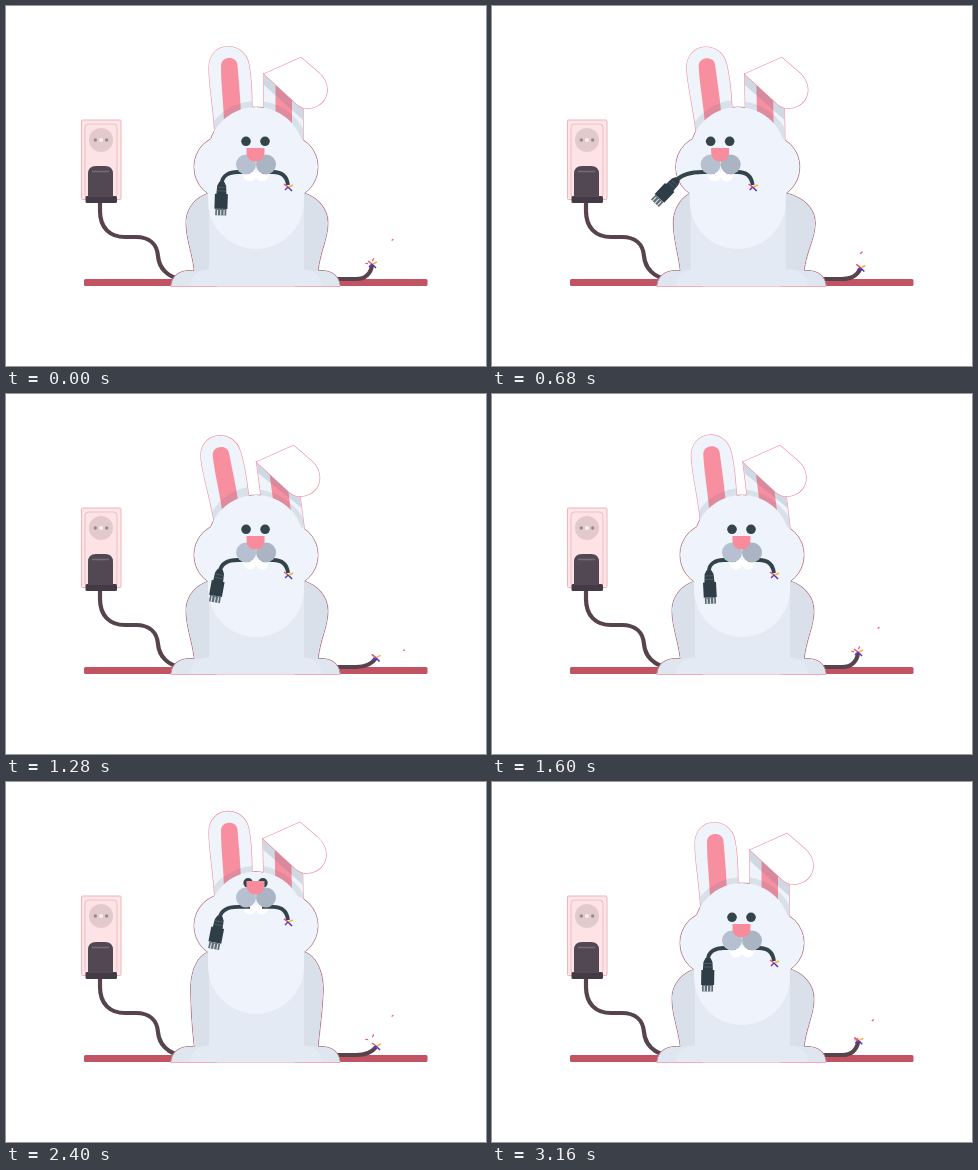
Recreate the animation shown at these times as an HTML page. Size 480x360 px, loop 3200 ms.

```html
<!DOCTYPE html>
<html lang="en">
<head>
<meta charset="utf-8">
<title>Rabbit and cable</title>
<style>
  html, body { margin: 0; width: 100%; height: 100%; overflow: hidden; background: #fff; }
  svg { display: block; width: 100vw; height: 100vh; }
  .rim { stroke: #f08fa0; stroke-width: 1.2; paint-order: stroke; }
  .cord { fill: none; stroke: #57434d; stroke-width: 4.2; }
  .lead { fill: none; stroke: #33434c; stroke-width: 3.8; }
  .wires { fill: none; stroke-width: 1.5; }
</style>
</head>
<body>
<svg viewBox="0 0 480 360">
  <defs>
    <path id="earShape" d="M209 132 C208 102 203 82 203 62 C203 34 239 34 243 59 C246 76 246 92 246 120Z"/>
    <path id="stemShape" d="M258 68 L297 103 V135 H258Z"/>
    <clipPath id="earClip"><use href="#earShape"/></clipPath>
    <clipPath id="stemClip"><use href="#stemShape"/></clipPath>
    <rect id="headShape" x="202" y="101" width="96" height="142" rx="48"/>
    <g id="cheekShape">
      <circle cx="220" cy="161" r="32"/>
      <circle cx="280" cy="161" r="32"/>
    </g>
    <path id="foot" d="M165 280 C166 270 173 264.5 184 264.5 H210 V280Z"/>
    <g id="feet">
      <use href="#foot"/>
      <use href="#foot" transform="matrix(-1 0 0 1 499 0)"/>
    </g>
    <path id="body"/>
    <g id="wires" class="wires">
      <path d="M0 0 L-4 -3" stroke="#e0566a"/>
      <path d="M0 0 L4 4" stroke="#5a2bc4"/>
      <path d="M-3 3 L0 0" stroke="#6a35c9"/>
      <path d="M1 0 L5 -2" stroke="#f6b52c"/>
    </g>
  </defs>

  <!-- wall socket -->
  <rect x="75.5" y="114" width="39.5" height="79.5" rx="1" fill="#fde6e8" stroke="#f2b3ba"/>
  <rect x="79" y="118" width="32" height="74" rx="3.5" fill="#fde3e5" stroke="#e9bfc4"/>
  <circle cx="95" cy="134" r="12" fill="#e2c9cc"/>
  <circle cx="95" cy="134" r="2" fill="#fbeff0"/>
  <circle cx="89.3" cy="134" r="1.7" fill="#9b878c"/>
  <circle cx="100.7" cy="134" r="1.7" fill="#9b878c"/>

  <rect x="78" y="273" width="343.5" height="7" rx="1.5" fill="#c25362"/>
  <path class="cord" d="M94 195 V205 C94 222 104 231 119 231 H130 C143 231 151 238 152 250 C153 262 162 272 176 273"/>
  <rect x="79.5" y="190" width="31.5" height="7" rx="1.5" fill="#433a45"/>
  <path d="M82 191 V168 Q82 160 90 160 H99 Q107 160 107 168 V191Z" fill="#514854"/>
  <path d="M86 165.5 H103" stroke="#766c78" stroke-width="1.5"/>
  <path id="loose" class="cord"/>
  <use id="looseWires" href="#wires"/>
  <g id="sparks" stroke="#ef5579" stroke-width="1.2"></g>

  <!-- rabbit -->
  <g class="rim">
    <use href="#body"/><use href="#feet"/>
    <use id="headRim" href="#headShape"/><use id="cheekRim" href="#cheekShape"/>
    <path d="M165 280 H334"/>
  </g>
  <g id="earL">
    <use href="#earShape" class="rim" fill="#eff3fa"/>
    <path d="M218 122 C218 98 215 82 215 60 C215 49.5 231 49.5 231.5 59 C233 78 235 98 235 115Z" fill="#f88fa1"/>
    <circle cx="250" cy="149" r="54" fill="#52708a" fill-opacity=".14" clip-path="url(#earClip)"/>
  </g>
  <g id="stem">
    <use href="#stemShape" class="rim" fill="#eff3fa"/>
    <g clip-path="url(#stemClip)">
      <rect x="269.5" y="70" width="16.5" height="60" fill="#f88fa1"/>
      <path d="M258 68 L297 103 V114 L258 79Z" fill="#52708a" fill-opacity=".2"/>
      <circle cx="250" cy="149" r="54" fill="#52708a" fill-opacity=".14"/>
    </g>
  </g>
  <path id="fold" class="rim" fill="#fff" d="M258 68 L295 51.5 L313 67 C330 83 318 105 298 102 C294 101 291 98.5 288 95.5Z"/>
  <use href="#body" fill="#d9e0ea"/>
  <use href="#feet" fill="#dfe6f0"/>
  <rect id="belly" x="203" y="170" width="95" height="95" fill="#e3eaf4"/>
  <path d="M184 280 C185 269 193 263.5 203 263.5 H297 C307 263.5 315 269 316 280Z" fill="#e3eaf4"/>
  <g fill="#eff3fb">
    <use id="head" href="#headShape"/><use id="cheeks" href="#cheekShape"/>
  </g>
  <g fill="#33444d">
    <circle id="eyeL" r="4.8"/><circle id="eyeR" r="4.8"/>
  </g>
  <g id="teeth" fill="#fff">
    <circle cx="244" cy="169" r="6.5"/>
    <circle cx="256" cy="169" r="6.5"/>
  </g>
  <g id="bite">
    <path id="lead" class="lead"/>
    <path class="lead" d="M256 166 H267 C277 166 281 171 282 179"/>
    <use href="#wires" transform="translate(282 181)"/>
    <g id="plug">
      <path d="M-2.5 -2 H2.5 L4.5 2 L5 10 H6.5 V25 H-6.5 V10 H-5 L-4.5 2Z" fill="#2e3d46"/>
      <path d="M-4 3.5 H4 M-4.5 7 H4.5" stroke="#53626b" stroke-width=".8"/>
      <rect x="-5.5" y="25" width="11" height="6.5" fill="#5d6b74"/>
      <path d="M-3.3 26 V31.5 M0 26 V31.5 M3.3 26 V31.5" stroke="#dfe5e9" stroke-width="1.1"/>
    </g>
  </g>
  <g id="muzzle">
    <circle cx="240" cy="158.5" r="10" fill="#b7c0d0"/>
    <circle cx="260" cy="158.5" r="10" fill="#abb4c2"/>
    <path d="M240.5 142 H258.5 V146 C258.5 152 255 155.5 249.5 155.5 C244 155.5 240.5 152 240.5 146Z" fill="#f88c9d"/>
  </g>
</svg>
<script>
const LOOP = 3200, STEP = 40, SPARK_LOOP = 800;
const $ = id => document.getElementById(id);
const set = (id, attrs) => {
  for (const key in attrs) $(id).setAttribute(key, attrs[key]);
};
const move = (id, x, y, extra = '') =>
  set(id, { transform: `translate(${x} ${y}) ${extra}` });

// Tracks are [time, value] pairs joined by smooth easing.
const tracks = {
  faceX: [[0, 0], [60, 0], [360, -25], [600, -25], [980, 7], [1300, 0], [LOOP, 0]],
  faceY: [[0, 0], [1600, 0], [1720, 3], [1920, -35], [2080, -43], [2440, -43], [2700, 3], [2800, 0], [LOOP, 0]],
  swing: [[0, 1], [200, -18], [400, 27], [540, 47], [700, 42], [1000, 0], [1120, -18], [1300, 10],
          [1460, -7], [1600, -4], [1720, 0], [1920, 27], [2080, 30], [2240, 2], [2400, 10], [2560, 4],
          [2700, -14], [2840, 23], [3000, -9], [LOOP, 1]],
  earL: [[0, 0], [200, 5], [400, -3], [600, -3], [960, -14], [1600, -4], [2000, -1], [2400, 0], [LOOP, 0]],
  earR: [[0, 0], [600, 0], [960, -8], [1600, -7], [1920, -4], [2400, -1], [2800, 0], [LOOP, 0]]
};

function at(track, t) {
  const i = track.findIndex(key => key[0] > t);
  const [t0, a] = track[i - 1], [t1, b] = track[i];
  const k = (t - t0) / (t1 - t0);
  return a + (b - a) * k * k * (3 - 2 * k);
}

// Start time, lifetime, start position and velocity in px per ms.
const sparks = [
  { start: 110, life: 350, x: 362, y: 256, vx: -.043, vy: -.13 },
  { start: 110, life: 430, x: 368, y: 258, vx: .084, vy: -.005 },
  { start: 640, life: 210, x: 365, y: 250, vx: .14, vy: -.105 },
  { start: 760, life: 280, x: 366, y: 256, vx: .042, vy: -.096 },
  { start: 740, life: 160, x: 364, y: 258, vx: -.08, vy: -.012 }
];
const sparkLines = sparks.map(() =>
  $('sparks').appendChild(document.createElementNS('http://www.w3.org/2000/svg', 'path')));

function drawSparks(t) {
  sparks.forEach((s, i) => {
    const age = (t - s.start + SPARK_LOOP) % SPARK_LOOP;
    const speed = Math.hypot(s.vx, s.vy);
    const size = 3.5 * (1 - age / s.life / 2);
    sparkLines[i].setAttribute('d', age > s.life ? '' :
      `M${s.x + s.vx * age} ${s.y + s.vy * age}l${-s.vx / speed * size} ${-s.vy / speed * size}`);
  });
}

function draw(t) {
  const pose = {};
  for (const name in tracks) pose[name] = at(tracks[name], t);
  const { faceX, faceY, swing, earL, earR } = pose;
  const headX = .2 * faceX, headY = .26 * faceY, cheekY = .4 * faceY;

  for (const id of ['head', 'headRim']) move(id, headX, headY);
  for (const id of ['cheeks', 'cheekRim']) move(id, headX, cheekY);
  for (const id of ['teeth', 'muzzle']) move(id, faceX, faceY);
  move('bite', faceX, .955 * faceY);
  move('earL', headX + .25 * earL, headY, `rotate(${.75 * earL} 228 112)`);
  move('fold', headX + earR, headY);

  // The stem leans from its root so that its tip stays under the fold.
  const root = 125, lean = earR / (root - 68);
  set('stem', { transform: `matrix(1 0 ${-lean} 1 ${headX + lean * root} ${headY})` });
  set('belly', { x: 203 + headX });

  const gap = 9.5 + .05 * faceY;
  const eyes = { cy: 135.3 + .8 * faceY };
  set('eyeL', { ...eyes, cx: 249.5 + faceX - gap });
  set('eyeR', { ...eyes, cx: 249.5 + faceX + gap });

  const left = 180 - .06 * faceX - .11 * faceY;
  const right = 322 - .06 * faceX + .11 * faceY;
  const neck = 187 + cheekY, arm = 217 + .25 * faceY;
  set('body', { d: `M${203 + headX} ${neck} C190 ${neck + 4} ${left} ${arm - 15} ${left} ${arm}
    C${left} ${arm + 16} 186 245 188.5 266 H312 C314 245 ${right} ${arm + 16} ${right} ${arm}
    C${right} ${arm - 15} 311 ${neck + 4} ${298 + headX} ${neck}Z` });

  const plugX = 216 - .24 * swing, plugY = 178 - .09 * swing;
  const tilt = swing * Math.PI / 180;
  set('lead', { d: `M244 166 H232 C224 166 ${plugX + 9 * Math.sin(tilt)} ${plugY - 9 * Math.cos(tilt)} ${plugX} ${plugY}` });
  move('plug', plugX, plugY, `rotate(${swing + 1})`);

  const sag = (1 - Math.cos(t / LOOP * 12 * Math.PI)) / 2;
  const tipX = 366 + 4 * sag, tipY = 259 + 6 * sag;
  set('loose', { d: `M325 273 H350 C360 273 ${tipX - 1 - 2 * sag} ${tipY + 8 - 4 * sag} ${tipX} ${tipY}` });
  move('looseWires', tipX, tipY - 1);
  drawSparks(t % SPARK_LOOP);
}

const begin = performance.now();
function tick() {
  const t = (performance.now() - begin) % LOOP;
  draw(Math.floor(t / STEP) * STEP);
  requestAnimationFrame(tick);
}
tick();
</script>
</body>
</html>
```
